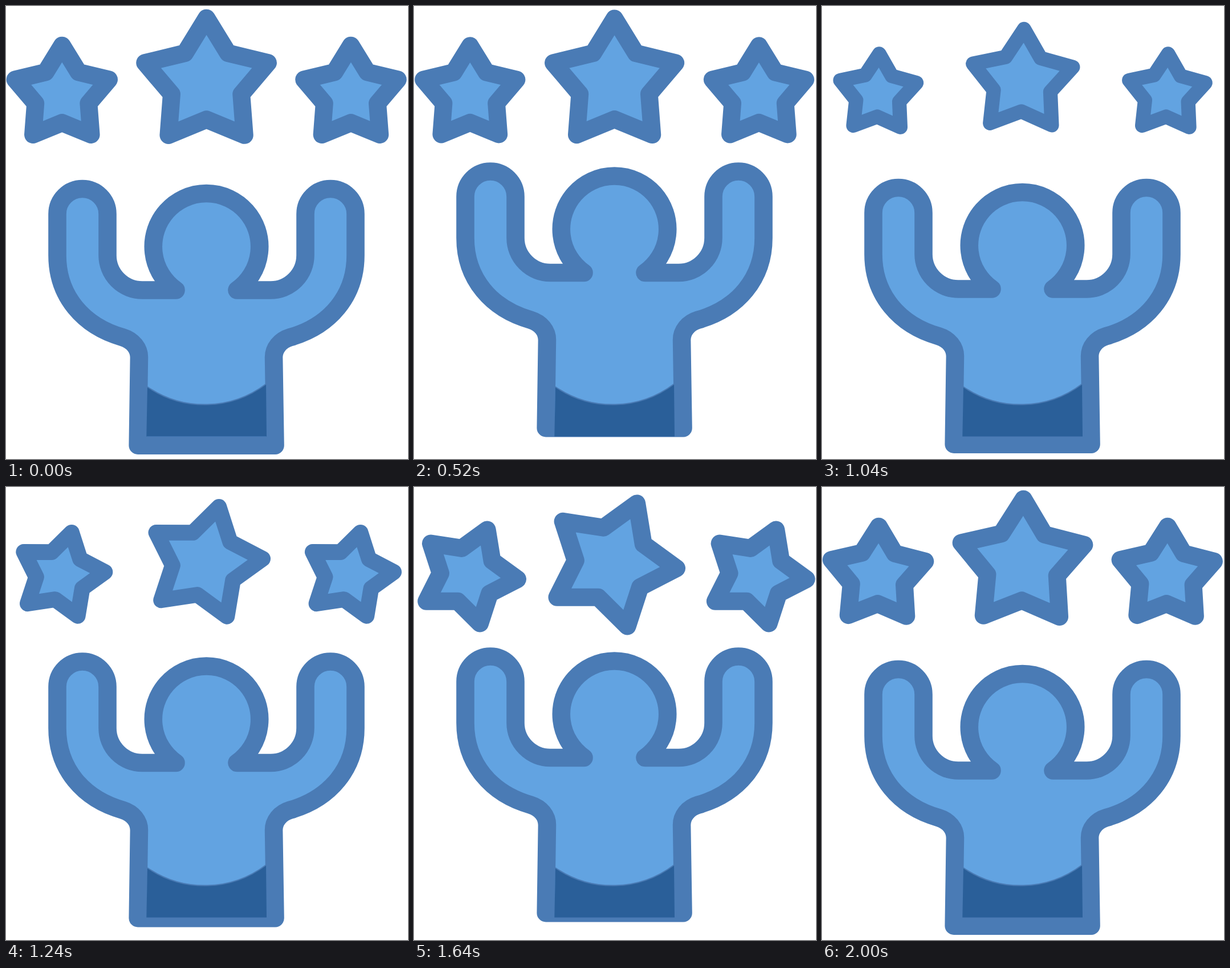
Animation, 705 px wide and 794 px high, one loop 2.04 s. Source, as an HTML page:

```html
<!DOCTYPE html>
<html lang="en">
<head>
<meta charset="utf-8">
<title>Winner with stars</title>
<style>
  html, body { margin: 0; width: 100%; height: 100%; overflow: hidden; background: #fff; }
  svg { display: block; width: 705px; height: 794px; }
  .shape { fill: #62a3e1; stroke: #4a7bb5; stroke-width: 31.6; stroke-linejoin: round; }
  .star { stroke-width: 31; }
</style>
</head>
<body>
<svg viewBox="0 0 705 794">
  <path id="body" class="shape" d="
    M231.2 770.2 L233.4 617 C234 600 222 586 205 580.8
    C135 561 90 508 90 437 V364.5 A44 44 0 0 1 178 364.5 V437
    A61 61 0 0 0 239 498 H298
    A93.2 93.2 0 1 1 405 498 H464
    A61 61 0 0 0 525 437 V364.5 A44 44 0 0 1 613 364.5 V437
    C613 508 568 561 498 580.8 C481 586 469 600 469.6 617
    L472 770.2 Z"/>
  <path fill="#2a5f99" d="M248 667.5 A178 178 0 0 0 456 662.5 L457 754.5 H246.3 Z"/>
  <path fill="none" stroke="#4a7bb5" stroke-width="2" d="M248 667.5 A178 178 0 0 0 456 662.5"/>
</svg>
<script>
const FRAME = 40, LOOP = 2040, BEAT = 504;
const LIFT = 31.5, SHRINK = 0.2, TILT = 30;
const svg = document.querySelector('svg');
const body = document.getElementById('body');

function starPath(cx, cy, radius) {
  const points = [];
  for (let i = 0; i < 10; i++) {
    const a = i * Math.PI / 5;
    const r = i % 2 ? radius * 0.567 : radius;
    points.push((cx + r * Math.sin(a)).toFixed(2) + ' ' + (cy - r * Math.cos(a)).toFixed(2));
  }
  return 'M' + points.join('L') + 'Z';
}

// px, py: pivot, the middle of the star's bounding box
function addStar(px, py, cy, radius) {
  const el = document.createElementNS(svg.namespaceURI, 'path');
  el.setAttribute('class', 'shape star');
  el.setAttribute('d', starPath(0, cy - py, radius));
  svg.append(el);
  return { el, px, py };
}

const stars = [
  addStar(98.3, 147.8, 155.6, 86.4),
  addStar(351.6, 123.8, 134.6, 113.4),
  addStar(604.9, 147.8, 155.6, 86.4)
];

// Linear rise and fall around a beat: 1 at the peak, 0 one beat away
const pulse = (beat, peak) => Math.max(0, 1 - Math.abs(beat - peak));

function draw(now) {
  const beat = Math.min(4, Math.floor(now % LOOP / FRAME) * FRAME / BEAT);
  const lift = LIFT * (pulse(beat, 1) + pulse(beat, 3));
  const scale = 1 - SHRINK * pulse(beat, 2);
  const angle = TILT * pulse(beat, 3);

  body.setAttribute('transform', `translate(0 ${-lift})`);
  for (const { el, px, py } of stars) {
    el.setAttribute('transform', `translate(${px} ${py}) rotate(${angle}) scale(${scale})`);
  }
}

const start = performance.now();
function tick() {
  draw(performance.now() - start);
  requestAnimationFrame(tick);
}
tick();
</script>
</body>
</html>
```
